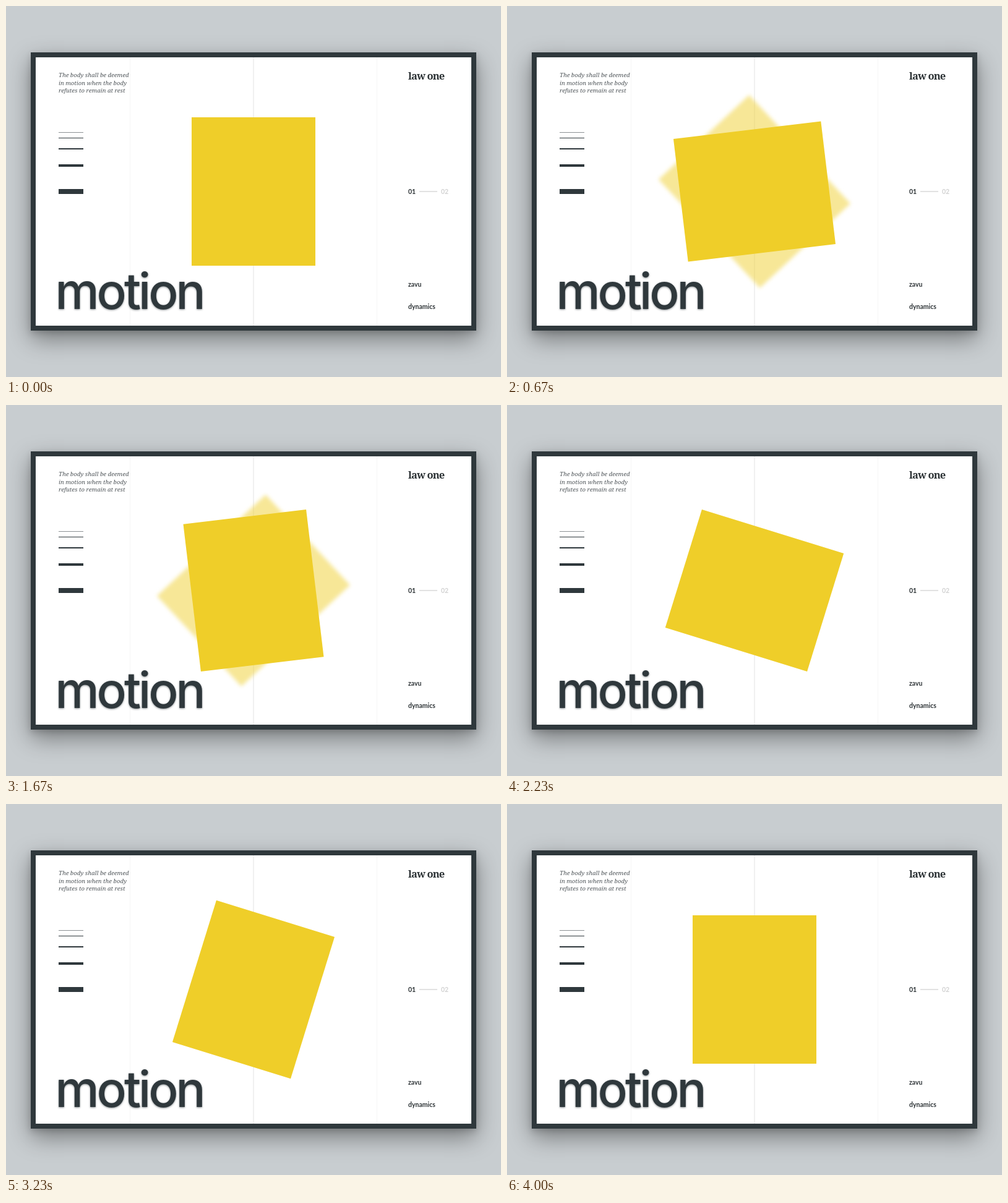
Write an HTML page with a canvas that moves like this. It is 800x600 px and loops after 4030 ms.

```html
<!DOCTYPE html>
<html lang="en">
<head>
<meta charset="utf-8">
<title>motion</title>
<style>
html, body { margin: 0; width: 100%; height: 100%; overflow: hidden; background: #c8cdd0; }
canvas { display: block; width: 800px; height: 600px; }
</style>
</head>
<body>
<canvas id="stage" width="800" height="600"></canvas>
<script>
const ctx = document.getElementById('stage').getContext('2d');
const LOOP = 4030, TICK = 1000 / 30;
const INK = '#2f383c', YELLOW = '#efce29';
const SERIF = '"Noto Serif", serif', SANS = 'Lato, sans-serif';

function bezier(x1, y1, x2, y2) {
  const at = (a, b, s) => 3 * (1 - s) * (1 - s) * s * a + 3 * (1 - s) * s * s * b + s * s * s;
  return x => {
    if (x <= 0) return 0;
    if (x >= 1) return 1;
    let lo = 0, hi = 1;
    for (let i = 0; i < 30; i++) {
      const mid = (lo + hi) / 2;
      if (at(x1, x2, mid) < x) lo = mid; else hi = mid;
    }
    return at(y1, y2, lo);
  };
}
const swing = bezier(0.195, 0.9, 0.3, 1.245);

function rect(x, y, w, h, fill) {
  ctx.fillStyle = fill;
  ctx.fillRect(x, y, w, h);
}

function shadow(color, blur, dy) {
  ctx.shadowColor = color;
  ctx.shadowBlur = blur;
  ctx.shadowOffsetY = dy;
}

function text(str, x, y, font, fill, spacing = 0) {
  ctx.font = font;
  ctx.letterSpacing = spacing + 'px';
  ctx.fillStyle = fill;
  ctx.fillText(str, x, y);
}

function block(deg, alpha = 1, blur = 0) {
  ctx.save();
  ctx.translate(400, 300);
  ctx.rotate(deg * Math.PI / 180);
  ctx.globalAlpha = alpha;
  if (blur) ctx.filter = `blur(${blur}px)`;
  rect(-100, -120, 200, 240, YELLOW);
  ctx.restore();
}

function drawCard() {
  rect(0, 0, 800, 600, '#c8cdd0');
  ctx.save();
  shadow('rgba(0,0,0,.4)', 35, 14);
  rect(40, 75, 720, 450, INK);
  shadow('rgba(0,0,0,.15)', 10, 4);
  rect(40, 75, 720, 450, INK);
  ctx.restore();
  rect(48, 83, 704, 434, '#fff');
  rect(200, 83, 1, 434, '#f5f5f5');
  rect(399, 83, 2, 434, '#f1f1f1');
  rect(599, 83, 1, 434, '#f5f5f5');
}

function drawLabels() {
  ['The body shall be deemed', 'in motion when the body', 'refutes to remain at rest']
    .forEach((line, i) => text(line, 85, 115 + i * 12.5, 'italic 9.6px ' + SERIF, '#50565a'));
  text('law one', 650, 119, 'bold 16.5px ' + SERIF, '#2d3336', -0.9);

  rect(85, 204, 40, 1, '#8c9194');
  [[213, 1], [230, 2], [256, 4], [296, 8]].forEach(([y, h]) => rect(85, y, 40, h, INK));

  const bold = 'bold 10.5px ' + SANS;
  text('01', 650, 304, bold, '#2d3336');
  rect(668, 299, 29, 2, '#e2e2e2');
  text('02', 703, 304, bold, '#d2d2d2');
  text('zavu', 650, 454, bold, '#2d3336');
  text('dynamics', 650, 490, bold, '#2d3336');

  ctx.save();
  shadow('rgba(20,30,35,.5)', 3, 1);
  text('motion', 79.5, 490, '500 80px Inter, sans-serif', INK, -4);
  ctx.restore();
}

function draw(sec) {
  const turn = Math.floor(sec + 1e-6);
  const part = Math.max(0, sec - turn);
  const base = -90 * turn;
  drawCard();
  // a soft echo follows in the second half of each quarter turn
  const late = part * 2 - 1;
  if (late > 0) block(base - 45 * swing(late), 0.56 * Math.sin(Math.PI * late), 3);
  block(base - 90 * swing(part));
  drawLabels();
}

const start = performance.now();
let last = -1;
function frame() {
  const t = Math.max(0, performance.now() - start) % LOOP;
  const tick = Math.min(120, Math.floor((t + 3.4) / TICK));
  if (tick !== last) {
    last = tick;
    draw(tick * TICK / 1000);
  }
  requestAnimationFrame(frame);
}
frame();
</script>
</body>
</html>
```
